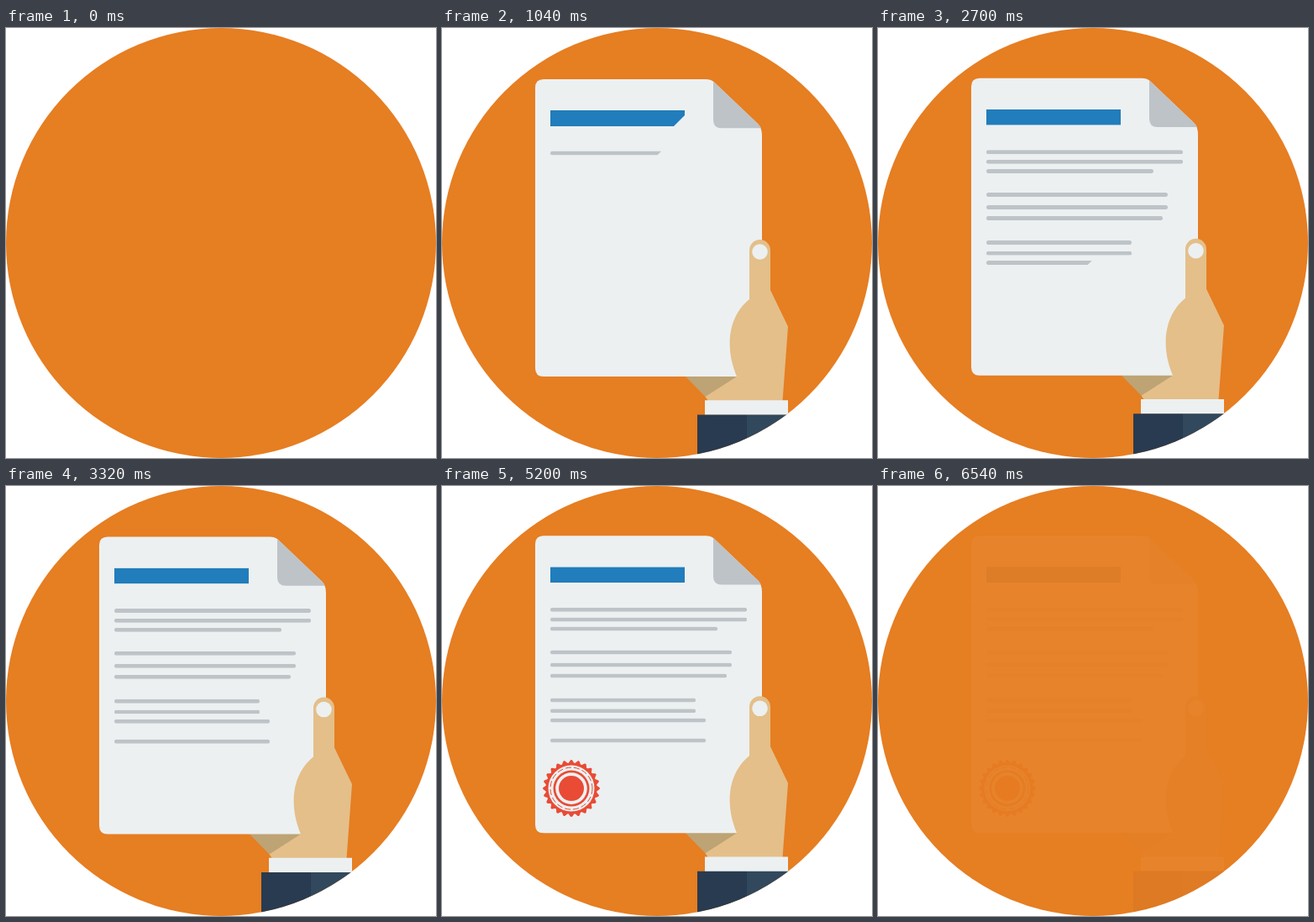
Write an HTML page that moves like this. It is 512x512 px and loops after 7.2 s.

```html
<!DOCTYPE html>
<html lang="en">
<head>
<meta charset="utf-8">
<title>Document in hand</title>
<style>
  html, body { margin: 0; height: 100%; overflow: hidden; background: #fff; }
  svg { display: block; width: 100vw; height: 100vh; }
</style>
</head>
<body>
<svg viewBox="0 0 512 512">
  <clipPath id="disc"><circle cx="256" cy="256" r="256"/></clipPath>
  <circle cx="256" cy="256" r="256" fill="#e67e22"/>
  <g clip-path="url(#disc)">
    <g id="scene">
      <path fill="#bea374" d="M289 413H352V438H313.500Z"/>
      <path fill="#ecf0f1" d="M121 60H314Q320 60 323.500 63L376 113Q381 118 381 127V414H121Q111 414 111 404V70Q111 60 121 60Z"/>
      <path fill="#bdc3c7" d="M323 62.500L376 113Q379 116 380 118.300H333Q323 118.300 323 108.300Z"/>
      <g id="text"></g>
      <g id="seal" fill="#e94b35" transform="translate(154 360.800)">
        <path id="rosette"/>
        <circle r="27.500" fill="#ecf0f1"/>
        <circle r="25" fill="none" stroke="#e94b35" stroke-width="1" stroke-dasharray="7 3"/>
        <circle r="21.500"/>
        <circle r="18.800" fill="#ecf0f1"/>
        <circle r="15"/>
      </g>
      <path fill="#e4bf89" d="M366 263.500A12.500 12.500 0 0 1 391 263.500V311L412 354.500L405.500 443H317L313.500 438L351 414C335 376 343 340 366 322Z"/>
      <circle cx="378.500" cy="265.500" r="9.300" fill="#ecf0f1"/>
      <path fill="#ecf0f1" d="M313 442.300h99v17.500h-99z"/>
      <path fill="#283b50" d="M304 459.500h59v60h-59z"/>
      <path fill="#31485d" d="M363 459.500h49v60h-49z"/>
    </g>
  </g>
</svg>
<script>
const LOOP = 7200;
const $ = id => document.getElementById(id);
const clamp = v => Math.min(1, Math.max(0, v));
const progress = (t, start, length) => clamp((t - start) / length);

// Each text strip is wiped in from the left with a slanted edge.
const strips = [];
function addStrip(y, right, height, radius, color, start) {
  const rect = document.createElementNS("http://www.w3.org/2000/svg", "rect");
  const width = right - 129;
  const attrs = { x: 129, y, width, height, rx: radius, fill: color };
  for (const name in attrs) rect.setAttribute(name, attrs[name]);
  $("text").append(rect);
  strips.push({ rect, width, height, start });
}

addStrip(97, 289, 19, 0, "#217dbb", 800);
[
  [148, 363], [159.6, 363], [170.8, 328],
  [198.8, 345], [213.8, 345], [226.7, 339],
  [255.8, 302], [268.5, 302], [279.8, 314],
  [303.7, 314]
].forEach(([y, right], i) =>
  addStrip(y - 2.5, right, 5, 2.5, "#bdc3c7", 897 + 204 * i));

const rim = Array.from({ length: 288 }, (_, i) => {
  const a = i * Math.PI / 144;
  const r = 32.2 + 1.8 * Math.cos(24 * a);
  return `${(r * Math.cos(a)).toFixed(2)} ${(r * Math.sin(a)).toFixed(2)}`;
});
$("rosette").setAttribute("d", `M${rim.join("L")}Z`);

function render(t) {
  const rise = 460 * (1 - progress(t, 80, 720)) ** 3;
  const bob = 0.1 + Math.cos(2 * Math.PI * (t / 1200 - 0.94));
  const scene = $("scene");
  scene.setAttribute("transform", `translate(0 ${rise + bob})`);
  scene.setAttribute("opacity", t < 100 ? 0 : Math.max(0.045, 1 - progress(t, 6000, 560)));

  for (const { rect, width, height, start } of strips) {
    const edge = progress(t, start, 260) * (width + height);
    rect.style.display = edge > 0 ? "" : "none";
    rect.style.clipPath =
      `polygon(0px 0px, ${edge}px 0px, ${edge - height}px ${height}px, 0px ${height}px)`;
  }
  $("seal").setAttribute("opacity", progress(t, 3360, 800));
}

// The final pose stays still until the loop restarts.
function tick() {
  render(Math.min(performance.now() % LOOP, 6540));
  requestAnimationFrame(tick);
}
tick();
</script>
</body>
</html>
```
